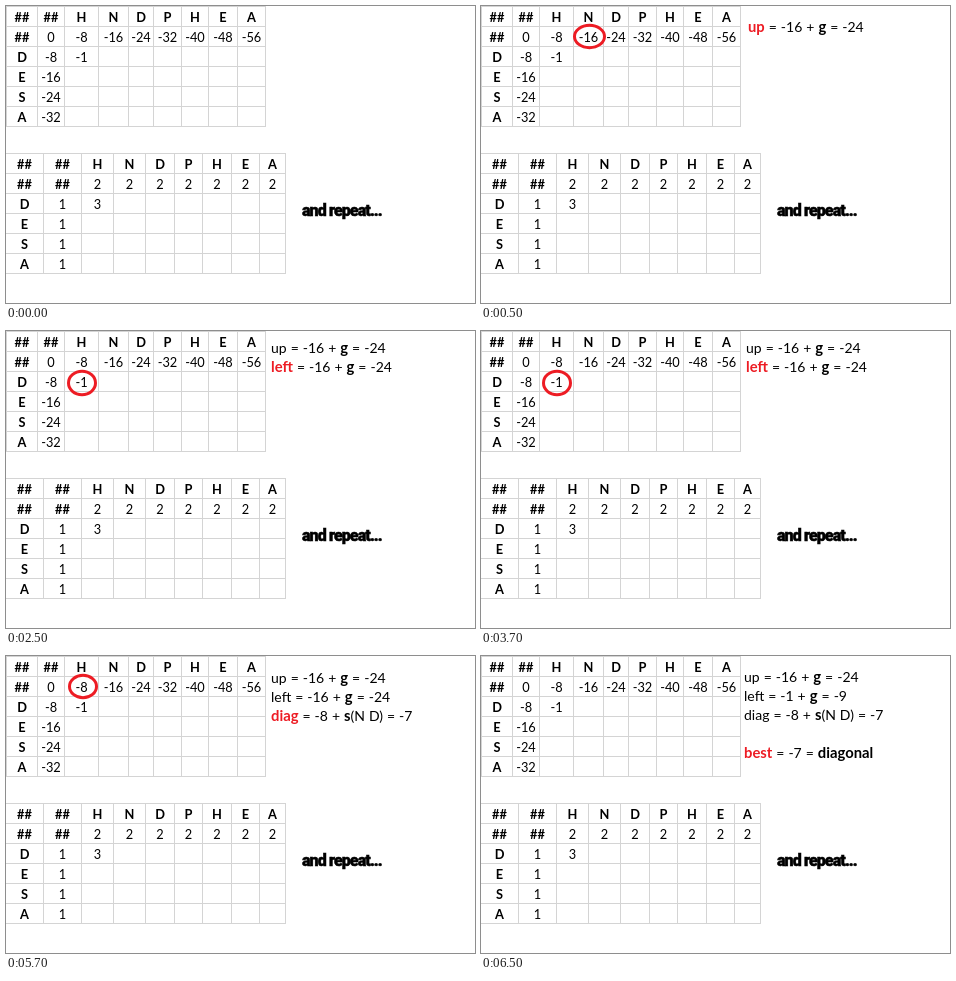
Write an HTML page that moves like this. It is 469 by 297 pixels and loops after 8000 ms.

```html
<!DOCTYPE html>
<html lang="en">
<head>
<meta charset="utf-8">
<title>Sequence alignment</title>
<style>
html, body { margin: 0; width: 100%; height: 100%; overflow: hidden; background: #fff }
svg { display: block }
text { font: 12.8px Lato, Carlito, sans-serif; white-space: pre }
.cell { text-anchor: middle }
.note { font-size: 14px; word-spacing: .4px }
.bold, .red { font-weight: 700 }
.red { fill: #ed1c24 }
tspan { font-size: 14.8px }
.repeat { font: 900 16px Impact, Roboto, sans-serif; font-stretch: 75%; letter-spacing: -.9px; stroke: #000; stroke-width: .5 }
path { stroke: #d4d4d4; fill: none; shape-rendering: crispEdges }
ellipse { stroke: #ed1c24; stroke-width: 3; fill: none }
</style>
</head>
<body>
<svg id="stage" width="469" height="297"></svg>
<script>
const stage = document.getElementById('stage');

// *word* is bold, !word! is bold red
const rich = s => s.replace(/\*(.+?)\*/g, '<tspan class="bold">$1</tspan>')
                   .replace(/!(.+?)!/g, '<tspan class="red">$1</tspan>');
const text = (cls, x, y, s) => `<text class="${cls}" x="${x}" y="${y}">${rich(s)}</text>`;

function table(top, cols, rows) {
  const right = cols.at(-1), bottom = top + rows.length * 20;
  let d = '', cells = '';
  for (const x of cols) d += `M${x + .5} ${top}V${bottom + 1}`;
  for (let y = top; y <= bottom; y += 20) d += `M0 ${y + .5}H${right + 1}`;
  rows.forEach((row, r) => row.split(' ').forEach((s, c) => {
    const bold = r == 0 || c == 0 || s == '##';
    cells += text(bold ? 'cell bold' : 'cell', (cols[c] + cols[c + 1]) / 2 + .5, top + 16 + r * 20, s);
  }));
  return `<path d="${d}"/>` + cells;
}

const ring = (x, y, rx, ry) => `<ellipse cx="${x}" cy="${y}" rx="${rx}" ry="${ry}"/>`;
const notes = (x, ...lines) => lines.map(([y, s]) => text('note', x, y, s)).join('');

const steps = [
  [0, ''],
  [500, ring(108.5, 30.5, 15, 11.2) +
    notes(267, [26, '!up! = -16 + *g* = -24'])],
  [2500, ring(76, 52, 13.5, 11.7) +
    notes(265, [22, 'up = -16 + *g* = -24'], [41, '!left! = -16 + *g* = -24'])],
  [4500, ring(77, 30.5, 13.5, 11.2) +
    notes(265, [27, 'up = -16 + *g* = -24'], [46, 'left = -16 + *g* = -24'], [65, '!diag! = -8 + *s*(N D) = -7'])],
  [6500,
    notes(263, [26, 'up = -16 + *g* = -24'], [45, 'left = -1 + *g* = -9'], [64, 'diag = -8 + *s*(N D) = -7'],
      [102, '!best! = -7 = *diagonal*'])]
];

stage.innerHTML =
  table(0, [0, 31, 58, 92, 122, 147, 175, 202, 231, 259],
    ['## ## H N D P H E A', '## 0 -8 -16 -24 -32 -40 -48 -56', 'D -8 -1', 'E -16', 'S -24', 'A -32']) +
  table(147, [-1, 37, 75, 107, 139, 168, 196, 225, 253, 279],
    ['## ## H N D P H E A', '## ## 2 2 2 2 2 2 2', 'D 1 3', 'E 1', 'S 1', 'A 1']) +
  text('repeat', 296, 210, 'and repeat...') +
  steps.map(s => `<g visibility="hidden">${s[1]}</g>`).join('');

const groups = stage.querySelectorAll('g');
const start = performance.now();

function draw() {
  const t = (performance.now() - start) % 8000;
  const current = steps.findLastIndex(s => t >= s[0]);
  groups.forEach((g, i) => g.setAttribute('visibility', i == current ? 'visible' : 'hidden'));
  requestAnimationFrame(draw);
}
draw();
</script>
</body>
</html>
```
